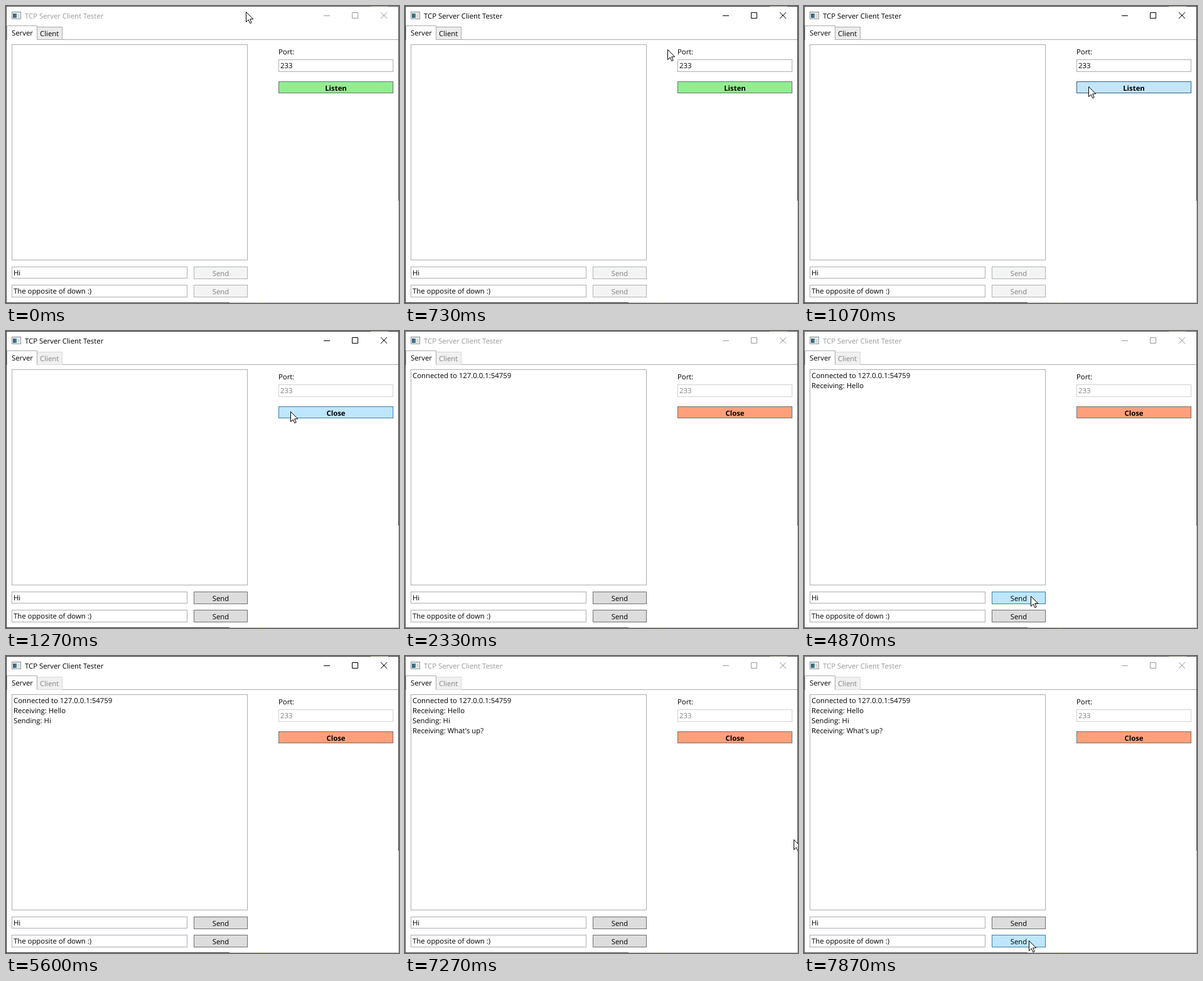
Recreate the animation shown at these times as an HTML page. Size 626 px wide and 473 px high, loop 8 s.

```html
<!DOCTYPE html>
<html lang="en">
<head>
<meta charset="utf-8">
<title>TCP Server Client Tester</title>
<style>
html, body { margin: 0; width: 100%; height: 100%; overflow: hidden; background: #fff; }
svg { display: block; width: 626px; height: 473px; cursor: default; }
text { font: 11.35px "Open Sans", "Noto Sans", sans-serif; text-rendering: geometricPrecision; white-space: pre; }
.bold { font-weight: 700; }
.mid { text-anchor: middle; }
</style>
</head>
<body>
<svg id="stage" viewBox="0 0 626 473"></svg>
<script>
const LOOP = 8000;
const stage = document.getElementById('stage');

function add(tag, attrs, content = '') {
  const el = document.createElementNS('http://www.w3.org/2000/svg', tag);
  set(el, attrs);
  el.textContent = content;
  return stage.appendChild(el);
}
function set(el, attrs) {
  for (const key in attrs) el.setAttribute(key, attrs[key]);
}
// Crisp one-pixel frame covering x0..x1, y0..y1.
function box(x0, y0, x1, y1, fill, stroke) {
  return add('rect', { x: x0 + .5, y: y0 + .5, width: x1 - x0 - 1, height: y1 - y0 - 1, fill, stroke });
}
function fill(x, y, width, height, color) {
  return add('rect', { x, y, width, height, fill: color });
}
function label(x, y, content, cls = '') {
  return add('text', { x, y, class: cls, fill: '#000' }, content);
}
function line(d, stroke = '#000') {
  return add('path', { d, fill: 'none', stroke });
}
function button(x0, y0, x1, y1, cls = '') {
  return {
    hit: (x, y) => x >= x0 && x < x1 && y >= y0 && y < y1,
    rect: box(x0, y0, x1, y1, '#ddd', '#707070'),
    text: label((x0 + x1) / 2, y0 + 15, 'Send', 'mid ' + cls)
  };
}

// Title bar
fill(0, 0, 626, 473, '#fff');
box(9, 9, 24, 21, '#f4f6f7', '#8c9296');
fill(10, 10, 13, 1, '#d5d9dc');
fill(11, 12, 6, 7, '#3c7f8c');
fill(11, 12, 3, 7, '#3a5e80');
fill(18, 12, 4, 7, '#d9dcde');
const title = label(30, 20, 'TCP Server Client Tester');
const chrome = [
  line('M506 15.5h10'),
  line('M551.5 10.5h9v9h-9z'),
  line('M597 10l10 10M607 10l-10 10')
];

// Tabs
line('M49 53.5h576', '#acacac');
const clientTab = box(49, 33, 90, 54, '#ececec', '#acacac');
const clientText = label(54, 48, 'Client');
line('M1.5 54V31.5H49.5V53.5', '#acacac');
fill(2, 32, 47, 22, '#fff');
label(9, 47, 'Server');

// Log and message fields
box(9, 61, 385, 405, '#fff', '#abadb3');
const log = [
  [2200, 'Connected to 127.0.0.1:54759'],
  [3800, 'Receiving: Hello'],
  [5467, 'Sending: Hi'],
  [6800, "Receiving: What's up?"]
].map(([at, content], i) => ({ at, el: label(12, 75 + 16 * i, content) }));

box(9, 415, 289, 434, '#fff', '#abadb3');
label(12, 429, 'Hi');
box(9, 444, 289, 464, '#fff', '#abadb3');
label(12, 458, 'The opposite of down :)');
const sends = [button(299, 415, 385, 435), button(299, 444, 385, 464)];

// Port panel
label(434, 77, 'Port:');
const portBox = box(434, 85, 617, 105, '#fff', '#abadb3');
const portText = label(437, 99, '233');
const listen = button(434, 120, 617, 139, 'bold');

// Window edge
const edge = line('M.5 473V.5H625.5V310M0 472.5H356');
line('M625.5 310V473M356 472.5H626', '#b4b4b4');
fill(581, 0, 28, 1, '#8a8672');
fill(405, 472, 5, 1, '#d8c640');

const cursor = add('path', {
  d: 'M.5 .5V16.5L4.2 12.9L6.8 18.6L9.2 17.6L6.7 11.9H11.7Z',
  fill: '#fff', stroke: '#000', 'stroke-linejoin': 'round'
});

// Pointer visits: shown from..until, moving start..end in equal steps.
const visits = [
  { from: 0, until: 2200, start: 270, end: 1070, steps: 12, a: [382, 9], b: [453, 128] },
  { from: 4400, until: 5600, start: 4400, end: 4870, steps: 7, a: [562, 264], b: [361, 422] },
  { from: 7270, until: 8000, start: 7270, end: 7870, steps: 9, a: [619, 292], b: [358, 453] }
];
const within = (t, spans) => spans.some(([a, b]) => t >= a && t < b);

function pointer(t) {
  const v = visits.find(v => t >= v.from && t < v.until);
  if (!v) return null;
  const raw = Math.min(1, Math.max(0, (t - v.start) / (v.end - v.start)));
  const p = Math.floor(raw * v.steps + 1e-6) / v.steps;
  const e = p * p * (3 - 2 * p);
  return v.a.map((n, i) => Math.round(n + (v.b[i] - n) * e));
}

function paint(btn, pos, pressed, enabled, base) {
  const over = enabled && pos && btn.hit(...pos);
  const [bg, border] = !enabled ? ['#f4f4f4', '#adb2b5']
    : over && pressed ? ['#c4e5f6', '#2c628b']
    : over ? ['#bee6fd', '#3c7fb1'] : [base, '#707070'];
  set(btn.rect, { fill: bg, stroke: border });
  set(btn.text, { fill: enabled ? '#000' : '#838383' });
}

function render(t) {
  const active = within(t, [[270, 2200], [5400, 6800]]);
  const pressed = within(t, [[1070, 1130], [5400, 5467]]);
  const open = t >= 1130;
  const pos = pointer(t);

  set(title, { fill: active ? '#000' : '#999' });
  chrome.forEach(el => set(el, { stroke: active ? '#000' : '#999' }));
  set(edge, { stroke: active ? '#303030' : '#505050' });

  set(clientTab, { fill: open ? '#f0f0f0' : '#ececec', stroke: open ? '#d9d9d9' : '#acacac' });
  set(clientText, { fill: open ? '#838383' : '#000' });
  set(portBox, { stroke: open ? '#d0d1d4' : '#abadb3' });
  set(portText, { fill: open ? '#808080' : '#000' });

  listen.text.textContent = open ? 'Close' : 'Listen';
  paint(listen, pos, pressed, true, open ? '#ffa07a' : '#90ee90');
  sends.forEach(b => paint(b, pos, pressed, open, '#ddd'));
  log.forEach(l => set(l.el, { visibility: t >= l.at ? 'visible' : 'hidden' }));

  set(cursor, { visibility: pos ? 'visible' : 'hidden' });
  if (pos) set(cursor, { transform: `translate(${pos})` });
}

const began = performance.now();
function tick() {
  render((performance.now() - began) % LOOP);
  requestAnimationFrame(tick);
}
tick();
</script>
</body>
</html>
```
